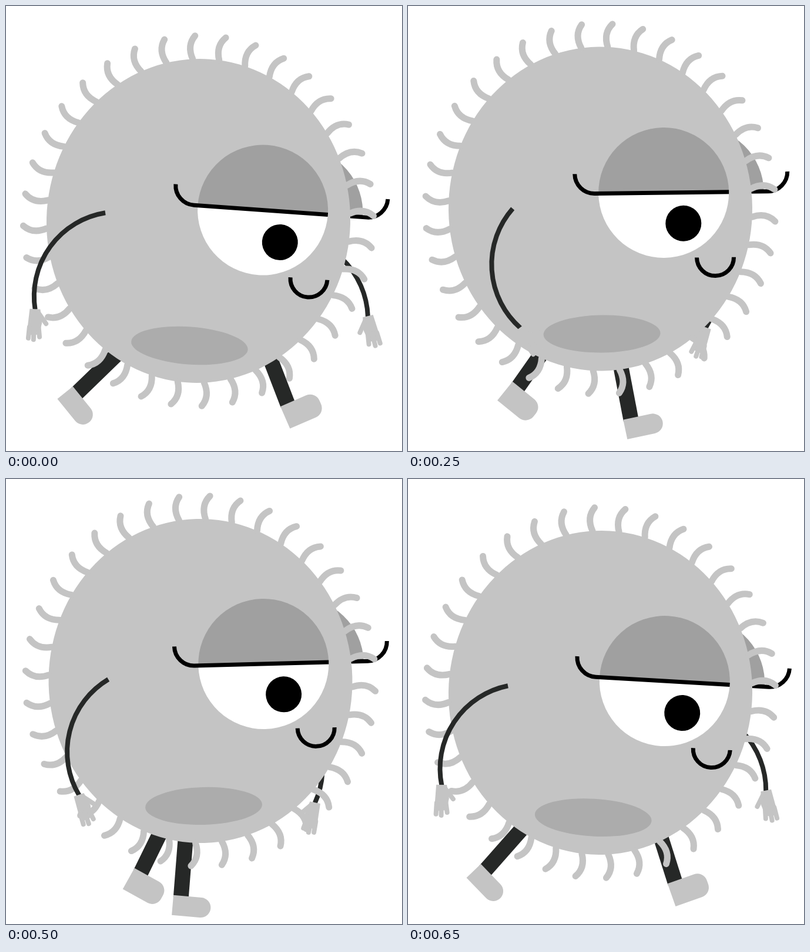
Recreate the animation shown at these times as an HTML page with a canvas. Size 674 by 758 pixels, loop 0.7 s.

```html
<!DOCTYPE html>
<html lang="en">
<head>
<meta charset="utf-8">
<title>Walking germ</title>
<style>
  html, body { margin: 0; width: 100%; height: 100%; overflow: hidden; background: #fff; }
  canvas { display: block; }
</style>
</head>
<body>
<canvas id="stage" width="674" height="758"></canvas>
<script>
const ctx = document.getElementById('stage').getContext('2d');
const LOOP = 700, STEP = 50, RAD = Math.PI / 180;
const SKIN = '#c4c4c4', LID = '#a0a0a0', PATCH = '#acacac', LIMB = '#262827', INK = '#000';
const BODY_RX = 258.5, BODY_RY = 276, EYE_R = 111, LASH_R = 33.5;
const EYE = { x: 108, y: -26.2 }, FAR_EYE_X = 167.5;

// Body height at every step of the walk.
const bob = [366, 361, 350.5, 342, 339.5, 345.5, 358, 366.5, 359, 347, 344, 349, 357, 364];

// time, body x, tilt | near arm x, y, swing | far arm x, y, swing | near foot x, y, pitch | far foot x, y, pitch
const poses = [
  [0,   327.5, 4.07,  -158.5, -14, 35.9,  139.5, 24, 47,    479, 677, 23.4,  122, 658, -51],
  [100, 325.5, 4.3,   -152.5, -9.5, 19.8, 134.5, 18.5, 35,  356, 694, -2.5,  142, 659, -41.5],
  [250, 327.5, -0.7,  -149.5, -0.5, -3.7, 130, 5, 14,       188, 648, -39,   379, 702, 12],
  [350, 330,   -3.6,  -152, 1.5, -5.3,    126, 6, 1,        145, 636, -49,   461, 680, 30],
  [500, 331,   -1.5,  -157, -3, 14.1,     123.5, 17, 20.5,  230, 669, -29,   298, 710, -5],
  [600, 328.5, 1.7,   -157.5, -9, 27.3,   137.5, 20, 35,    378, 701, 0,     177, 689, -33.5],
  [650, 327.5, 3.3,   -157.5, -12, 33.6,  139, 22, 44.5,    454, 685, 19.5,  133, 665, -46]
];

function keyAt(i) {
  const n = poses.length, wrap = Math.floor(i / n), pose = poses[i - wrap * n];
  return { time: pose[0] + wrap * LOOP, pose };
}

// Periodic cubic interpolation through the poses.
function poseAt(time) {
  let i = poses.length - 1;
  while (poses[i][0] > time) i--;
  const [a, b, c, d] = [i - 1, i, i + 1, i + 2].map(keyAt);
  const h0 = b.time - a.time, h1 = c.time - b.time, h2 = d.time - c.time;
  const u = (time - b.time) / h1, v = 1 - u;
  return b.pose.map((p, k) => {
    const q = c.pose[k];
    const s0 = (p - a.pose[k]) / h0, s1 = (q - p) / h1, s2 = (d.pose[k] - q) / h2;
    const m0 = (h1 * s0 + h0 * s1) / (h0 + h1), m1 = (h2 * s1 + h1 * s2) / (h1 + h2);
    return (1 + 2 * u) * v * v * p + u * v * v * h1 * m0 + u * u * (3 - 2 * u) * q - u * u * v * h1 * m1;
  });
}

function at(x, y, degrees, draw) {
  ctx.save();
  ctx.translate(x, y);
  ctx.rotate(degrees * RAD);
  draw();
  ctx.restore();
}

function fill(color, path) {
  ctx.beginPath();
  path();
  ctx.fillStyle = color;
  ctx.fill();
}

function stroke(color, width, cap, path) {
  ctx.beginPath();
  path();
  ctx.strokeStyle = color;
  ctx.lineWidth = width;
  ctx.lineCap = cap;
  ctx.stroke();
}

function line(x1, y1, x2, y2) {
  ctx.moveTo(x1, y1);
  ctx.lineTo(x2, y2);
}

function drawHand() {
  fill(SKIN, () => {
    ctx.moveTo(-9, -1);
    ctx.lineTo(9, -1);
    ctx.lineTo(13, 22);
    ctx.lineTo(9, 42);
    ctx.lineTo(-12, 44);
  });
  stroke(SKIN, 8, 'round', () => {
    line(-8, 30, -9, 49);
    line(0, 30, 0, 51);
    line(7, 25, 10, 46);
    line(6, 5, 20, 23);
  });
}

function drawArm(x, y, swing, side) {
  ctx.save();
  ctx.translate(x, y);
  ctx.scale(side, 1);
  ctx.rotate(swing * RAD);
  stroke(LIMB, 8, 'butt', () => ctx.arc(102, 102, 144, 225 * RAD, 135 * RAD, true));
  at(0, 204, -33, drawHand);
  ctx.restore();
}

function drawLeg(x, y, pitch, shoeHeight) {
  at(x, y, -pitch * 0.9, () => stroke(LIMB, 26, 'butt', () => line(0, 3, 0, -125)));
  at(x, y, -pitch, () => fill(SKIN, () => ctx.roundRect(-13, 0, 65, shoeHeight, [0, 17, 17, 0])));
}

function drawLid(x) {
  fill(LID, () => ctx.arc(x, EYE.y, EYE_R, Math.PI, 0));
}

function drawFarEye() {
  drawLid(FAR_EYE_X);
  stroke(INK, 7, 'butt', () => {
    ctx.moveTo(200, EYE.y);
    ctx.arc(285.5, EYE.y - LASH_R, LASH_R, Math.PI / 2, 0, true);
  });
}

function drawBody() {
  fill(SKIN, () => ctx.ellipse(0, 0, BODY_RX, BODY_RY, 0, 0, 2 * Math.PI));
  for (let k = 0; k < 36; k++) {
    const u = (k * 10 - 6.5) * RAD, s = Math.sin(u), c = Math.cos(u);
    const normal = Math.atan2(s / BODY_RX, c / BODY_RY) / RAD;
    at(BODY_RX * s, -BODY_RY * c, normal, () => stroke(SKIN, 11, 'round', () => {
      ctx.moveTo(0, 0);
      ctx.quadraticCurveTo(-9, -23.5, 6, -39.5);
    }));
  }
  fill(PATCH, () => ctx.ellipse(0, 213, 99.5, 32, 0, 0, 2 * Math.PI));
}

function drawFace() {
  fill('#fff', () => ctx.arc(EYE.x, EYE.y, EYE_R, 0, Math.PI));
  drawLid(EYE.x);
  stroke(INK, 7, 'butt', () => {
    ctx.arc(-9.5, EYE.y - LASH_R, LASH_R, Math.PI, Math.PI / 2, true);
    ctx.lineTo(EYE.x + EYE_R, EYE.y);
  });
  fill(INK, () => ctx.arc(141, 26.5, 30.5, 0, 2 * Math.PI));
  stroke(INK, 7, 'butt', () => ctx.arc(194.5, 85, 31.5, Math.PI, 0, true));
}

function draw(time) {
  const [, x, tilt, armX, armY, armSwing, farArmX, farArmY, farArmSwing,
    footX, footY, footPitch, farFootX, farFootY, farFootPitch] = poseAt(time);
  const y = bob[time / STEP];
  ctx.fillStyle = '#fff';
  ctx.fillRect(0, 0, 674, 758);
  drawArm(x + farArmX, y + farArmY, farArmSwing, -1);
  drawLeg(farFootX, farFootY, farFootPitch, 34);
  drawLeg(footX, footY, footPitch, 41);
  at(x, y, tilt, () => {
    drawFarEye();
    drawBody();
    drawFace();
  });
  drawArm(x + armX, y + armY, armSwing, 1);
}

const start = performance.now();
function tick() {
  const elapsed = Math.max(0, performance.now() - start) % LOOP;
  draw(Math.floor(elapsed / STEP) * STEP);
  requestAnimationFrame(tick);
}
tick();
</script>
</body>
</html>
```
